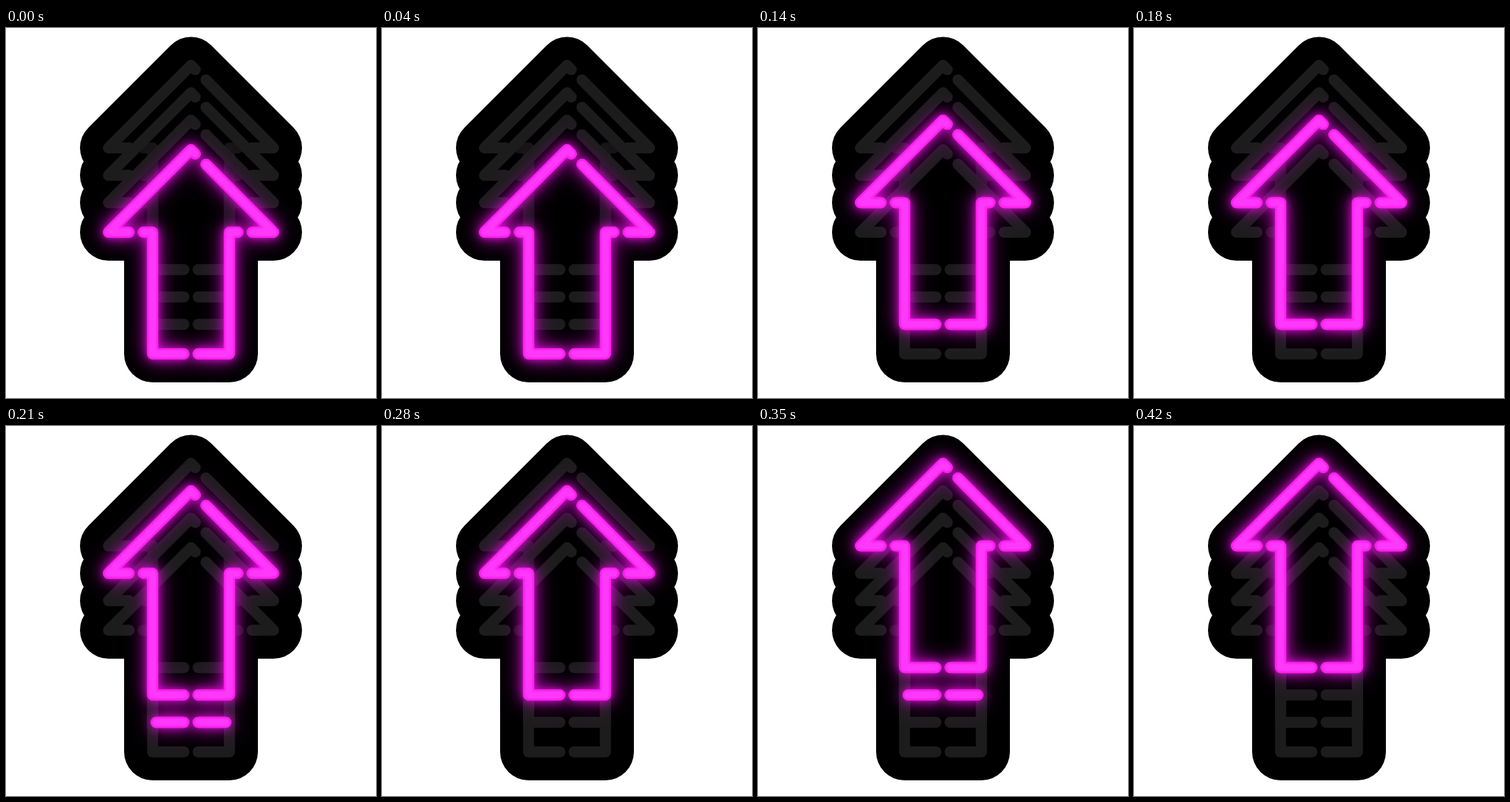
Recreate the animation shown at these times as an HTML page with a canvas. Size 520 by 520 pixels, loop 0.49 s.

```html
<!DOCTYPE html>
<html>
<head>
<meta charset="utf-8">
<title>Neon arrow</title>
<style>
  html, body { margin: 0; width: 100%; height: 100%; overflow: hidden; background: #fff; }
  canvas { display: block; }
</style>
</head>
<body>
<canvas id="stage" width="520" height="520"></canvas>
<script>
const ctx = document.getElementById('stage').getContext('2d');
const STEP = 70, STEPS = 7, TUBE = 15.5;
const RISE = [0, 41.5, 80, 118.5]; // height of each arrow above the lowest

// Tube centre lines of the lowest arrow
const HEAD = [
  'M266 177 L260 171 L144 287 H173',
  'M346 287 H376 L281 191.5'
].join('');
const SHAFT = 'M193 287 H206 V458 H250 M270 458 H314 V287 H326';
const BAR = 'M211 458 H250 M270 458 H309';
const BODY = 'M260 171 L376 287 H314 V458 H206 V287 H144 Z';

function raised(d, level) {
  const path = new Path2D();
  path.addPath(new Path2D(d), new DOMMatrix().translate(0, -RISE[level]));
  return path;
}

function stroke(path, color, width, blur = 0, glow = 'transparent') {
  ctx.strokeStyle = color;
  ctx.lineWidth = width;
  ctx.shadowBlur = blur;
  ctx.shadowColor = glow;
  ctx.stroke(path);
}

function drawBoard() {
  const shade = ctx.createLinearGradient(0, 290, 0, 345);
  shade.addColorStop(0, '#151515');
  shade.addColorStop(1, '#1c1c1c');
  RISE.forEach((_, i) => {
    const body = raised(BODY, i);
    ctx.fillStyle = '#000';
    ctx.shadowColor = 'transparent';
    ctx.fill(body);
    stroke(body, '#000', 80);
  });
  RISE.forEach((_, i) => stroke(raised(SHAFT, i), shade, TUBE));
  RISE.forEach((_, i) => stroke(raised(HEAD, i), '#1c1c1c', TUBE));
}

function drawLit(path) {
  stroke(path, '#ff18ee', TUBE, 30, '#c000c0');
  stroke(path, '#ff18ee', TUBE, 14, '#e010d8');
  stroke(path, '#ff38fa', 9, 5, '#ff40ff');
}

function draw(time) {
  const step = Math.floor(time / STEP) % STEPS;
  const level = Math.ceil(step / 2);
  ctx.clearRect(0, 0, 520, 520);
  ctx.lineCap = ctx.lineJoin = 'round';
  drawBoard();
  const lit = raised(HEAD + SHAFT, level);
  // The base of the previous arrow lingers for one step
  if (step % 2) lit.addPath(raised(BAR, level - 1));
  drawLit(lit);
}

const start = performance.now();
function tick() {
  draw(performance.now() - start);
  requestAnimationFrame(tick);
}
tick();
</script>
</body>
</html>
```
